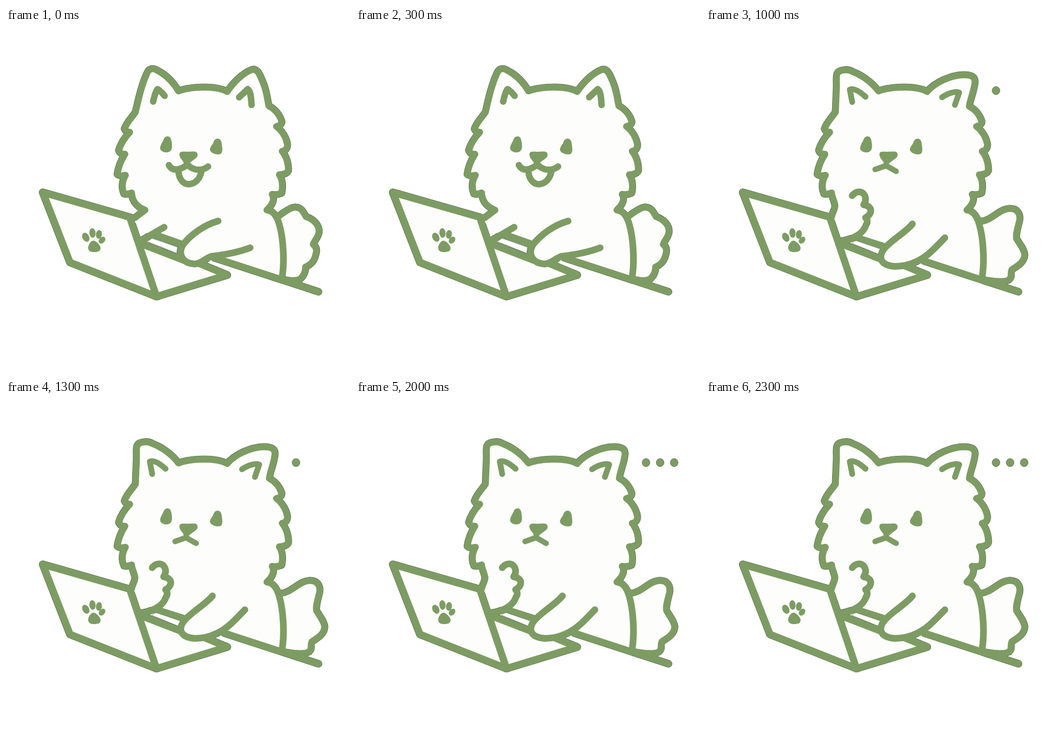
An HTML page for the animation above (2500 ms loop, 720 by 720 pixels).

```html
<!DOCTYPE html>
<html lang="en">
<head>
<meta charset="utf-8">
<title>Dog at a laptop</title>
<style>
  html, body { margin: 0; width: 100%; height: 100%; overflow: hidden; background: #fff; }
  svg { display: block; width: 100vw; height: 100vh; }
  path { fill: none; stroke-linecap: round; stroke-linejoin: round; }
  .edge { stroke: #46583a; }
  .line { stroke: #7d9c63; }
  .skin { fill: #fdfdfc; }
  .solid { fill: #7d9c63; }
  .slot { fill: #fff; stroke: #46583a; stroke-width: .6; }
  .dot { fill: #7d9c63; stroke: #46583a; stroke-width: .7; }
</style>
</head>
<body>
<svg id="stage" viewBox="0 0 720 720"></svg>
<script>
const LOOP = 2500;
const stage = document.getElementById('stage');

function add(parent, tag, attrs) {
  const el = document.createElementNS('http://www.w3.org/2000/svg', tag);
  for (const key in attrs) el.setAttribute(key, attrs[key]);
  return parent.appendChild(el);
}

// Visible from `from` to `to` within each loop, with hard cuts.
function show(el, from, to) {
  const keys = [[0, from === 0], [from, 1], [to, 0], [LOOP, to === LOOP]];
  el.animate(
    keys.map(([t, on]) => ({ offset: t / LOOP, opacity: on ? 1 : 0, easing: 'step-end' })),
    { duration: LOOP, iterations: Infinity }
  );
}

// Head outline, clockwise from the left cheek
const leftFur = ' Q254,349 247,347 C242,335 242,322 250,308 Q238,311 233,306 C235,290 240,278 249,264' +
  ' Q240,265 236,256 C240,242 248,230 259,218 Q250,217 248,211 C252,198 263,188 271,176';
const rightFur = ' C565,171 573,183 577,195 Q578,203 566,206 C578,215 587,230 589,244 Q589,256 578,258' +
  ' C586,268 591,283 591,298 Q588,306 572,307 C579,318 580,330 577,345 Q568,350 557,348 C563,358 558,370 546,381';
const crown = ' C374,127 392,124 415,124 S452,127 463,133';
const flank = ' C558,382 567,393 572,411 C581,442 583,490 578,521';
const belly = ' L440,484 L400,494 L366,475 L372,454 L300,432 Z';

const earsTucked = ' C277,150 284,118 295,95 C299,84 308,83 317,89 C335,98 350,113 361,132' + crown +
  ' C475,115 494,95 515,87 C527,84 532,100 538,114 C546,133 547,150 550,163';
const earsSpread = ' L273,130 C274,115 272,104 274,97 C277,86 298,86 306,91 C327,99 348,114 361,132' + crown +
  ' C479,114 512,99 538,98 C556,98 563,102 563,113 C561,133 553,148 551,164';

const screen = 'M77,344 L259,396 L315,562 L134,490.5 Z';
const keys = 'M284,452 L372,486 L405,493 L463,517 L315,562';

const eyes = 'M330,233 C333,225 344,224 346,235 C348,246 349,255 342,259 C336,262 326,260 323,254 C321,248 327,240 330,233 Z' +
  'M434,240 C436,230 448,228 451,239 C452,247 455,258 450,263 C444,267 430,263 427,256 C426,250 431,246 434,240 Z';
const nose = 'M363,265 C363,257 370,259 381,259 C392,259 401,256 401,266 C401,273 390,276 384,283 L372,283 C371,277 363,273 363,265 Z';
const pad = 'M184,445 C190,447 198,455 198,461 C198,468 190,469 184,469 C178,469 172,467 172,460 C172,453 178,445 184,445 Z';
const toes = [[167, 438, 7, 10, -28], [181, 429, 6.5, 10, -5], [194.5, 432, 6.2, 9, 8], [201, 444, 6, 8, 40]];

const smile = 'M341,287 C348,300 362,299 380,286 C392,299 410,300 423,290' +
  'M361,302 C363,318 372,327 383,327 C396,326 406,316 409,300';
const frown = 'M354,296 L377,288 L398,300 M377,288 L378,278';

const innerTucked = 'M308,154 C310,145 313,133 317,128 C322,130 327,136 332,142' +
  'M488,145 L506,128 C513,133 513,150 514,161';
const innerSpread = 'M306,155 L301,129 C310,125 323,134 334,144' +
  'M494,145 C507,136 522,132 530,135 L521,161';

const tailLow = 'M572,393 C585,383 598,375 606,375 C618,376 622,384 628,395 C645,401 656,413 655,427' +
  ' C653,440 645,445 643,453 C650,458 651,466 648,475 C645,488 638,495 627,500 C627,512 622,520 615,526 C605,530 590,529 577,524';
const tailHigh = 'M575,405 C600,402 612,380 634,378 C652,377 659,389 656,404 C652,420 648,432 650,441' +
  ' C656,452 666,463 667,475 C666,492 648,500 640,506 C636,516 642,520 634,527 C625,533 600,530 580,526';

const armReach = 'M444,404 C415,412 387,432 370,454 C360,472 367,492 395,494 C410,493 417,482 430,478 C455,475 485,470 511,460';
const armPress = 'M432,410 C420,426 388,444 373,462 C360,478 363,497 396,499 C430,499 456,482 470,469 C482,458 490,449 500,439';

const typing = {
  cheek: 'M259,398 L270,397 L291,381 C278,376 264,365 263,345', ears: earsTucked, inner: innerTucked,
  tail: tailLow, arm: armReach, far: 'M331,417 L281,446', table: 'M436,481 L654,552',
  ledge: 'M312,433 L372,454', slot: 'M297,447 L305,440 L359,459 L357,471 Z', mouth: smile
};
const pressing = {
  ...typing,
  cheek: 'M255,391 C265,382 280,382 291,381 C278,376 264,365 263,345', ears: earsSpread, inner: innerSpread,
  tail: tailHigh, arm: armPress, far: 'M330,418 C318,428 295,428 274,435', table: 'M457,488 L654,552',
  ledge: 'M310,433 L374,455', slot: 'M281,442 L300,438 L364,462 L361,472 Z'
};
const thinking = {
  ...pressing,
  cheek: 'M263,395 C265,385 271,378 270,371 C268,360 263,352 263,345', mouth: frown,
  far: 'M306,351 C316,338 333,341 334,358 C334,364 332,367 330,370 C348,373 350,387 334,397' +
    ' C339,402 338,408 335,412 C329,432 308,441 284,446',
  ledge: 'M318,440 L374,458', slot: 'M305,450 L314,445 L367,463 L363,474 Z'
};

function drawPose(pose) {
  const g = add(stage, 'g', {});
  const path = (cls, d, width) => add(g, 'path', { class: cls, d, ...(width && { 'stroke-width': width }) });
  const head = pose.cheek + leftFur + pose.ears + rightFur;
  const outline = [[head + flank, 14], [pose.tail, 14], [pose.table, 14.5], [pose.ledge, 15],
    [pose.far, 14], [screen, 15], [keys, 15]];

  for (const [d, w] of [...outline, [pose.arm, 14]]) path('edge', d, w + 1.2);
  for (const d of [head + flank + belly, pose.tail, keys, screen]) path('skin', d);
  for (const [d, w] of outline) path('line', d, w);
  path('slot', pose.slot);

  // The front paw rests on top of the keyboard.
  path('skin', pose.arm);
  path('line', pose.arm, 14);

  path('line', pose.inner, pose.inner === innerTucked ? 13.5 : 12);
  path('line', pose.mouth, pose.mouth === frown ? 11.5 : 13.5);
  for (const d of [eyes, nose, pad]) path('solid', d);
  for (const [cx, cy, rx, ry, turn] of toes) {
    add(g, 'ellipse', { class: 'solid', cx, cy, rx, ry, transform: `rotate(${turn} ${cx} ${cy})` });
  }
  return g;
}

show(drawPose(typing), 0, 500);
show(drawPose(pressing), 500, 1000);
show(drawPose(thinking), 1000, LOOP);
for (let i = 0; i < 3; i++) {
  const dot = add(stage, 'ellipse', { class: 'dot', cx: 607 + i * 29.5, cy: 131, rx: 8.2, ry: 8.6 });
  show(dot, 1000 + i * 500, LOOP);
}
</script>
</body>
</html>
```
